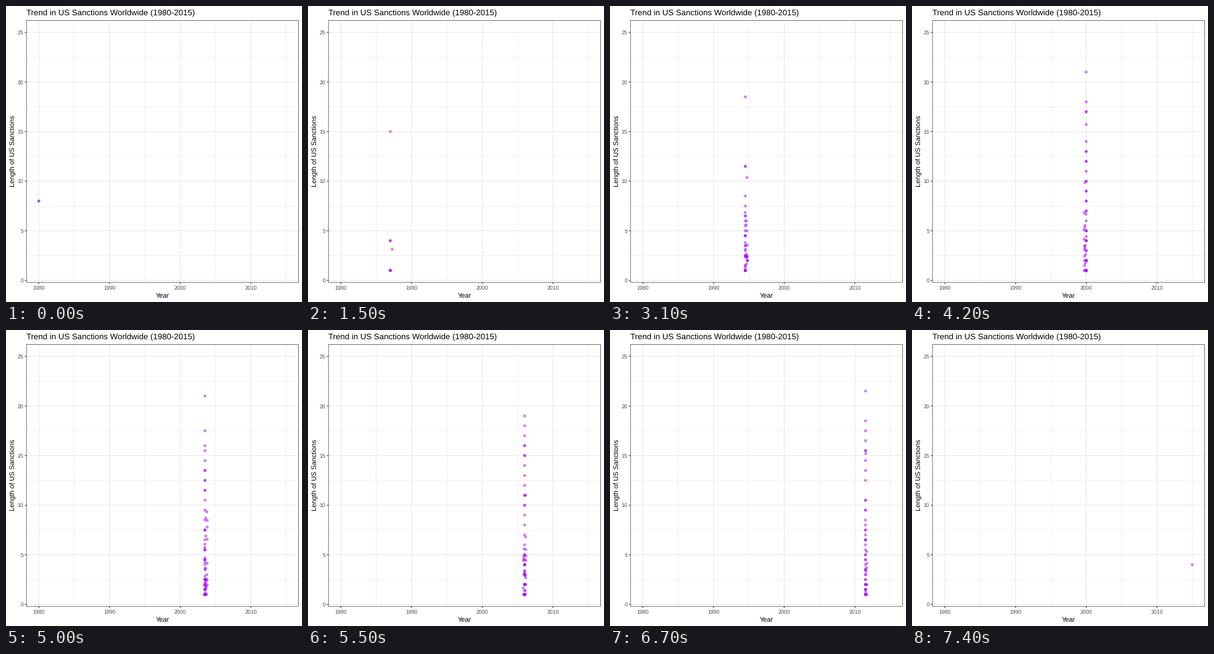
These frames come from a looping animation (480 by 480 pixels, 7.5 s). A matplotlib script:

```python
import random

import matplotlib.pyplot as plt
import numpy as np
from matplotlib.animation import FuncAnimation
from matplotlib.patches import Rectangle

plt.rcParams["font.family"] = "Liberation Sans"
plt.rcParams["text.hinting"] = "none"
random.seed(12)

SIZE, FRAMES, SPAN = 480, 75, 35
LEFT, RIGHT, TOP, BOTTOM = 33.2, 474.5, 23.5, 448.2
X_STEP = (RIGHT - LEFT) / (SPAN * 1.1)
Y_STEP = (BOTTOM - TOP) / 26.4
GRID, DARK, GREY, PURPLE = "#e8e8e8", "#333333", "#4d4d4d", "#a816f5"


def px(t):
    return LEFT + (t + SPAN * 0.05) * X_STEP


def py(v):
    return BOTTOM - (v + 0.2) * Y_STEP


# Every year sits on a whole frame; time runs linearly between them.
YEARS = np.arange(SPAN + 1)
YEAR_FRAMES = np.round(YEARS * (FRAMES - 1) / SPAN)
TIMES = np.round(np.interp(range(FRAMES), YEAR_FRAMES, YEARS), 6)


def build_tracks():
    """Sanctions as (birth, first seen, last seen); they age a year per year."""
    last = SPAN - 0.1
    # The longest ones shape the upper edge of the column.
    tracks = [(-7, 0, 5), (-7, 0, 10), (-3, 10, 17), (0, 17, 20), (3.5, 16, 23.5),
              (8.5, 20, 28.5), (9, 9, 30.4), (11, 11, last), (32, 32, SPAN)]
    for born in [4, 4, *range(7, 21)]:
        tracks.append((born, born, min(last, born + random.uniform(14, 20))))
    for year in range(8, SPAN):
        rate = np.interp(year, [8, 15, 20, 24, 28, 34], [1, 3, 5, 9, 8, 3])
        for _ in range(round(rate)):
            born = year + random.choice([0, 0, 0.5])
            life = min(18, random.expovariate(1 / 4))
            tracks.append((born, born, min(last, born + life)))
    return tracks


def build_gaps():
    """Points that skip years, so they run slightly off the beat."""
    gaps = []
    for _ in range(95):
        a = int(random.triangular(2, 30, 21))
        b = min(SPAN - 1, a + random.randint(2, 10))
        low = random.random() < 0.15
        v, w = [1 if low else min(18, 1 + int(random.expovariate(1 / 3.5)))
                for _ in range(2)]
        gaps.append((a, b, v, w))
    return gaps


TRACKS, GAPS = build_tracks(), build_gaps()


def points(frame):
    t = TIMES[frame]
    on_year = t == round(t)
    pts = []
    for born, first, last in TRACKS:
        if first <= t <= last:
            v = 1 + t - born
            pts.append((t, np.floor(v + 0.5) if on_year else v))
    for a, b, v, w in GAPS:
        fa, fb = YEAR_FRAMES[a], YEAR_FRAMES[b]
        if fa < frame < fb:
            k = (frame - fa) / (fb - fa)
            pts.append((a + (b - a) * k, v + (w - v) * k))
    ones = np.interp(t, [0, 7, 20, 25, SPAN], [0, 3, 8, 8, 0])
    return pts + [(t, 1)] * int(np.ceil(ones))


fig = plt.figure(figsize=(SIZE / 72, SIZE / 72), dpi=72, facecolor="white")
ax = fig.add_axes([0, 0, 1, 1])
ax.set(xlim=(0, SIZE), ylim=(SIZE, 0))
ax.axis("off")


def line(x, y, color, width):
    ax.plot(x, y, color=color, lw=width, zorder=1, solid_capstyle="butt", snap=False)


def label(x, y, text, size, color="black", **kw):
    ax.text(x, y, text, fontsize=size, color=color,
            **{"ha": "center", "va": "baseline", **kw})


for t in range(0, SPAN + 1, 5):
    major = t % 10 == 0
    line([px(t)] * 2, [TOP, BOTTOM], GRID, 1.07 if major else 0.6)
    if major:
        line([px(t)] * 2, [BOTTOM, BOTTOM + 2.75], DARK, 1.07)
        label(px(t), 460.2, str(1980 + t), 8.8, GREY)
for k in range(11):
    v, major = k * 2.5, k % 2 == 0
    line([LEFT, RIGHT], [py(v)] * 2, GRID, 1.07 if major else 0.6)
    if major:
        line([LEFT - 2.75, LEFT], [py(v)] * 2, DARK, 1.07)
        label(28.4, py(v) + 3.2, f"{v:.0f}", 8.8, GREY, ha="right")

dots = ax.scatter([], [], s=4.7 ** 2, color=PURPLE, alpha=0.55, linewidths=0, zorder=3)
dots.set_facecolor([PURPLE, PURPLE])  # a colour pair avoids whole-pixel placement
ax.add_patch(Rectangle((LEFT, TOP), RIGHT - LEFT, BOTTOM - TOP, fill=False,
                       ec=DARK, lw=0.7, zorder=4, snap=False))
label(33, 15, "Trend in US Sanctions Worldwide (1980-2015)", 13.2, ha="left")
label(253.4, 473, "Year", 11)
label(16.8, 234.8, "Length of US Sanctions", 11, rotation=90, ha="right", va="center")


def draw(frame):
    dots.set_offsets([(px(x), py(v)) for x, v in points(frame)])
    return (dots,)


anim = FuncAnimation(fig, draw, frames=FRAMES, interval=100, repeat=True,
                     repeat_delay=0)
plt.show()
```
